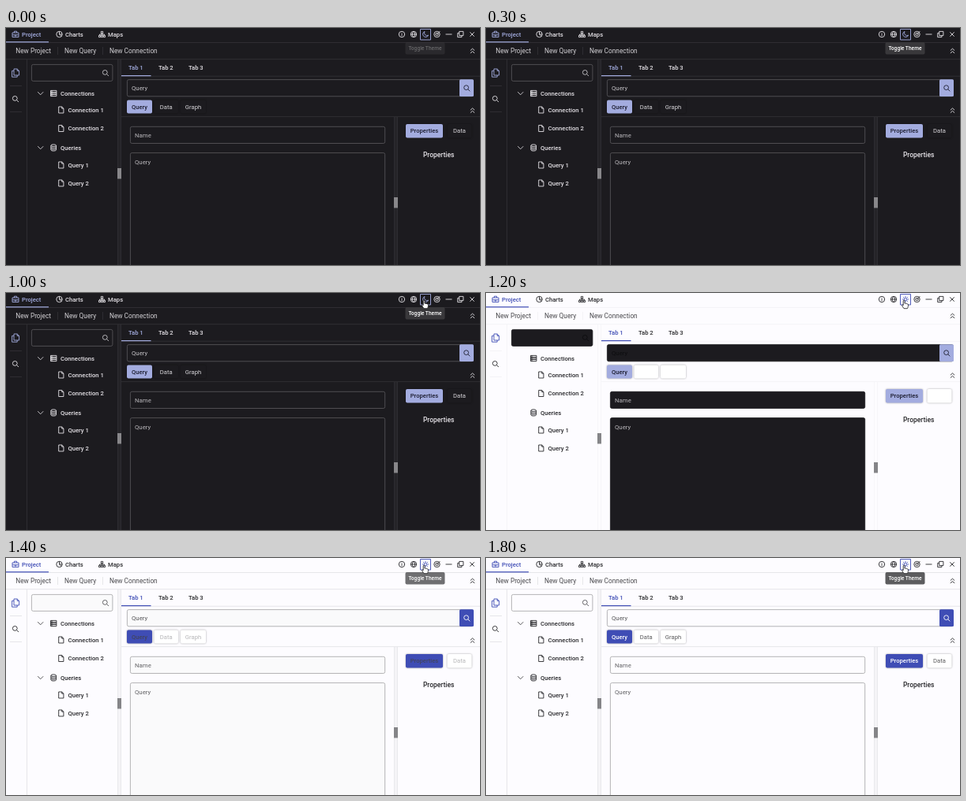
Animation, 600 px wide and 301 px high, one loop 2000 ms. Source, as an HTML page:

```html
<!DOCTYPE html>
<html lang="en">
<head>
<meta charset="utf-8">
<title>Theme toggle</title>
<style>
html, body { margin: 0; height: 100%; overflow: hidden; background: #1c1b1f; }
svg { display: block; width: 100vw; height: 100vh; background: var(--bg); }
text { font: 500 7.65px Roboto, sans-serif; fill: var(--text); }
.bar { font-weight: 400; font-size: 8.3px; fill: var(--soft); }
.label { font-weight: 400; font-size: 7.8px; fill: var(--label); }
.value { font-weight: 400; font-size: 7.8px; fill: var(--value); }
.head { font-size: 8.5px; }
.accent { fill: var(--accent); }
.on { fill: var(--onText); }
.off { fill: var(--offText); font-weight: 400; }
.mid { text-anchor: middle; }
.field { fill: var(--field); stroke: var(--edge); stroke-width: .8; }
.line { fill: var(--line); }
.grip { fill: var(--grip); }
.btn { filter: drop-shadow(0 .7px .8px rgba(0, 0, 0, .35)); }
.icon { fill: none; stroke: var(--text); stroke-width: .9; stroke-linejoin: round; }
#tip rect { fill: var(--tip); }
#tip text { fill: #fff; font-size: 6.65px; }
</style>
</head>
<body>
<svg id="stage" viewBox="0 0 600 301" preserveAspectRatio="none"></svg>
<script>
// Colours: dark theme, then the three switching steps, then the light theme.
const theme = {
  bg:      ['#1c1b1f', '#fdfcff', '#fdfcff', '#fdfcff', '#fdfcff'],
  text:    ['#e4e1e6', '#29292c', '#29292c', '#29292c', '#29292c'],
  soft:    ['#d2d0d4', '#4a4a4d', '#4a4a4d', '#4a4a4d', '#4a4a4d'],
  accent:  ['#a3acdf', '#3f4db5', '#3f4db5', '#3f4db5', '#3f4db5'],
  label:   ['#bab8bc', '#bab8bc', '#68686a', '#626265', '#626265'],
  value:   ['#c6c4c8', '#0d0d0f', '#4c4c4f', '#555558', '#555558'],
  field:   ['#1c1b1f', '#1c1b1f', '#e0e0e1', '#fafafb', '#fdfcff'],
  edge:    ['#5c5b5f', '#1c1b1f', '#a2a2a4', '#a2a2a4', '#a2a2a4'],
  line:    ['#343337', '#f3f2f5', '#e2e1e4', '#e2e1e4', '#e2e1e4'],
  gutter:  ['#252428', '#fdfcff', '#f5f4f7', '#f5f4f7', '#f5f4f7'],
  grip:    ['#88878a', '#858588', '#858588', '#858588', '#858588'],
  fold:    ['#d2d0d4', '#fdfcff', '#4a4a4d', '#4a4a4d', '#4a4a4d'],
  on:      ['#a3acdf', '#a3acdf', '#4855b9', '#3f4db5', '#3f4db5'],
  onText:  ['#1c1d30', '#1c1d30', '#252947', '#42455f', '#ffffff'],
  off:     ['#1c1b1f', '#ffffff', '#ffffff', '#ffffff', '#ffffff'],
  offText: ['#d8d6da', '#ffffff', '#dedee0', '#b6b6b8', '#58585a'],
  glass:   ['#1c1d30', '#1c1d30', '#ffffff', '#ffffff', '#ffffff'],
  tip:     ['#39383b', '#5c5c5e', '#5c5c5e', '#5c5c5e', '#5c5c5e']
};

const rect = (x, y, w, h, attrs) =>
  `<rect x="${x}" y="${y}" width="${w}" height="${h}" ${attrs}/>`;
const text = (x, y, s, cls = '') => `<text x="${x}" y="${y}" class="${cls}">${s}</text>`;
const path = (x, y, d, attrs = '') =>
  `<path class="icon" transform="translate(${x} ${y})" d="${d}" ${attrs}/>`;
const line = (x, y, w, h) => rect(x, y, w, h, 'class="line"');
const field = (x, y, w, h) => rect(x, y, w, h, 'class="field" rx="2"');
const paint = c => `style="stroke:var(--${c})"`;
const ring = r => `M${-r} 0a${r} ${r} 0 1 0 ${2 * r} 0a${r} ${r} 0 1 0 ${-2 * r} 0`;
const button = (x, y, w, h, s, kind) =>
  rect(x, y, w, h, `rx="2" class="btn" style="fill:var(--${kind})"`) +
  text(x + w / 2, y + h / 2 + 2.7, s, kind + ' mid');

const shapes = {
  page: 'M-3 -4H1L3.2 -1.8V4H-3ZM1 -4V-1.8H3.2',
  fold: 'M-3.5 -1.8L0 1.8L3.5 -1.8',
  up: 'M-2.6 -.4L0 -2.8L2.6 -.4M-2.6 3L0 .6L2.6 3',
  find: 'M1.6 1.6L4 4M-3.6 -.6a2.9 2.9 0 1 0 5.8 0a2.9 2.9 0 1 0 -5.8 0',
  server: 'M-3.7 -3.6H3.7V-1.2H-3.7ZM-3.7 -1.2H3.7V1.2H-3.7ZM-3.7 1.2H3.7V3.6H-3.7ZM-2.2 -4V4',
  base: 'M-3.3 -2.8a3.3 1.3 0 1 0 6.6 0a3.3 1.3 0 1 0 -6.6 0V2.8a3.3 1.3 0 0 0 6.6 0V-2.8M-3.3 -.9a3.3 1.3 0 0 0 6.6 0M-3.3 1a3.3 1.3 0 0 0 6.6 0',
  copy: 'M-1.6 -3.6H3.6V1.6H-1.6ZM-1.6 -1.6H-3.6V3.6H1.6V1.6',
  files: 'M-2 -5H2.2L4.6 -2.6V3H-2ZM2.2 -5V-2.6H4.6M-2 -2.6H-4.4V5.2H2.2V3',
  case: 'M-4 -2H4V3.5H-4ZM-1.6 -2V-3.8H1.6V-2M-4 .8H4M-.8 .8V2H.8V.8',
  tree: 'M-1.2 -3.6H1.2V-1.4H-1.2ZM-4 1.4H-1.8V3.6H-4ZM-1.1 1.4H1.1V3.6H-1.1ZM1.8 1.4H4V3.6H1.8ZM0 -1.4V1.4M-2.9 1.4V0H2.9V1.4',
  globe: ring(3.7) + 'M-3.7 0H3.7M0 -3.7C-2.2 -1.5 -2.2 1.5 0 3.7C2.2 1.5 2.2 -1.5 0 -3.7',
  moon: 'M-1 -3.5A3.6 3.6 0 1 0 3.6 1.2A3.4 3.4 0 0 1 -1 -3.5Z',
  hand: 'M-1.6 5.3L-3.9 1.8C-4.6 .7 -3.2 .1 -2.4 1.3V-4.2C-2.4 -5.6 -.6 -5.6 -.6 -4.2V-1.1C.1 -1.6 .9 -1.3 1 -.8C1.7 -1.2 2.5 -.9 2.5 -.3C3.3 -.6 3.9 -.2 3.9 .5C3.9 2.8 3.5 3.8 2.8 5.3Z'
};
const icon = (name, x, y, attrs) => path(x, y, shapes[name], attrs);
const rays = [...Array(8)].map((_, i) => {
  const c = Math.cos(i * Math.PI / 4), s = Math.sin(i * Math.PI / 4);
  return `M${2.7 * c} ${2.7 * s}L${4 * c} ${4 * s}`;
}).join('');

const gutters = [141, 491].map((x, i) => {
  const top = i ? 113 : 40, grip = i ? 215 : 178;
  return rect(x, top, 5, 301 - top, 'style="fill:var(--gutter)"') +
    line(x, top, .6, 301) + line(x + 4.4, top, .6, 301) +
    rect(x, grip, 5, 13.5, 'class="grip"');
}).join('');

const header =
  icon('case', 12, 8, paint('accent')) + text(20, 11, 'Project', 'accent') +
  path(67.5, 8, ring(3.7) + 'M0 -3.7V0L2.6 2.6M0 0H3.7') + text(75, 11, 'Charts') +
  icon('tree', 121.5, 8) + text(129, 11, 'Maps') +
  path(501, 8, ring(3.7) + 'M0 -.6V2M0 -2V-1.3') + icon('globe', 516, 8) +
  rect(524.5, 1.5, 13, 13.5, `class="icon" ${paint('accent')}`) +
  icon('moon', 531, 8, `id="moon" ${paint('accent')}`) +
  path(531, 8, ring(1.9) + rays, `id="sun" ${paint('accent')}`) +
  path(545.5, 8, ring(3.7) + ring(1.7) + 'M0 0L3.8 -3.8') +
  path(560.5, 8, 'M-4 0H4') + icon('copy', 575.3, 8) +
  path(590, 8, 'M-2.7 -2.7L2.7 2.7M2.7 -2.7L-2.7 2.7') +
  line(0, 18, 600, .8) + rect(0, 17.2, 54, 1.2, 'class="accent"') +
  text(12.3, 32, 'New Project', 'bar') + line(65, 24, .8, 10) +
  text(74, 32, 'New Query', 'bar') + line(122, 24, .8, 10) +
  text(131, 32, 'New Connection', 'bar') +
  icon('up', 590.5, 29) + line(0, 39.3, 600, .8);

const leaf = (y, s) => icon('page', 69.7, y) + text(78.5, y + 2.8, s);
const branch = (y, s, name) =>
  icon('fold', 43.7, y, paint('fold')) + icon(name, 60.2, y) + text(69, y + 2.8, s);

const sidebar =
  line(26, 40, .8, 261) +
  icon('files', 12, 57, paint('accent')) + line(5, 73, 15, .8) +
  icon('find', 12, 90) + line(5, 106, 15, .8) +
  field(32.4, 46.4, 102.5, 21) + icon('find', 126, 57, paint('value')) +
  branch(83, 'Connections', 'server') + leaf(104, 'Connection 1') + leaf(127.5, 'Connection 2') +
  branch(152, 'Queries', 'base') + leaf(174, 'Query 1') + leaf(197, 'Query 2');

const main =
  text(155, 53.3, 'Tab 1', 'accent') + text(193, 53.3, 'Tab 2') + text(231, 53.3, 'Tab 3') +
  line(146, 60.8, 454, .8) + rect(146, 60, 37.5, 1.2, 'class="accent"') +
  field(153.4, 65.6, 438, 21.2) + text(159, 79, 'Query', 'value') +
  rect(574, 65.3, 18, 21.8, 'rx="1.5" style="fill:var(--on)"') +
  icon('find', 583.3, 76.3, paint('glass')) +
  button(153, 91.5, 32, 17, 'Query', 'on') +
  button(187.5, 91.5, 30.5, 17, 'Data', 'off') +
  button(221, 91.5, 32, 17, 'Graph', 'off') +
  icon('up', 590.5, 104.7) + line(146, 112.3, 454, .8) +
  field(157.4, 125.3, 322.3, 21.2) + text(163, 138.6, 'Name', 'label') +
  field(157.4, 158.6, 322.3, 160) + text(163, 172.6, 'Query', 'label') +
  button(506, 122, 47, 17.5, 'Properties', 'on') +
  button(558.5, 122, 31, 17.5, 'Data', 'off') +
  text(547.7, 164.4, 'Properties', 'head mid');

const overlay =
  `<g id="tip">${rect(505.5, 18, 50, 15.6, 'rx="2"')}${text(530.5, 28.4, 'Toggle Theme', 'mid')}</g>` +
  icon('hand', 530.6, 14.4, 'id="hand" style="fill:#fff;stroke:#161618;stroke-width:.8"');

const stage = document.getElementById('stage');
stage.innerHTML = gutters + header + sidebar + main + overlay;
const [moon, sun, tip, hand] = ['moon', 'sun', 'tip', 'hand'].map(id => document.getElementById(id));
const tipLabel = tip.querySelector('text');
const show = (el, on) => { el.style.display = on ? '' : 'none'; };

function draw(now) {
  const step = Math.floor(now % 2000 / 100);
  const light = step >= 12;
  const stop = light ? Math.min(step - 11, 3) : 0;
  const settle = [0, 50, 85, 100][Math.max(0, Math.min(step - 14, 3))];
  for (const [name, c] of Object.entries(theme)) {
    stage.style.setProperty('--' + name,
      settle ? `color-mix(in srgb, ${c[4]} ${settle}%, ${c[3]})` : c[stop]);
  }
  show(moon, !light);
  show(sun, light);
  show(hand, step >= 8);
  tip.style.opacity = light ? [0, .65, .88, .96][step - 12] ?? 1 : [.5, .75, .9][step] ?? 1;
  tipLabel.style.opacity = light ? 1 : [.6, .8, .95][step] ?? 1;
}

const start = performance.now();
function tick() {
  draw(performance.now() - start);
  requestAnimationFrame(tick);
}
tick();
</script>
</body>
</html>
```
